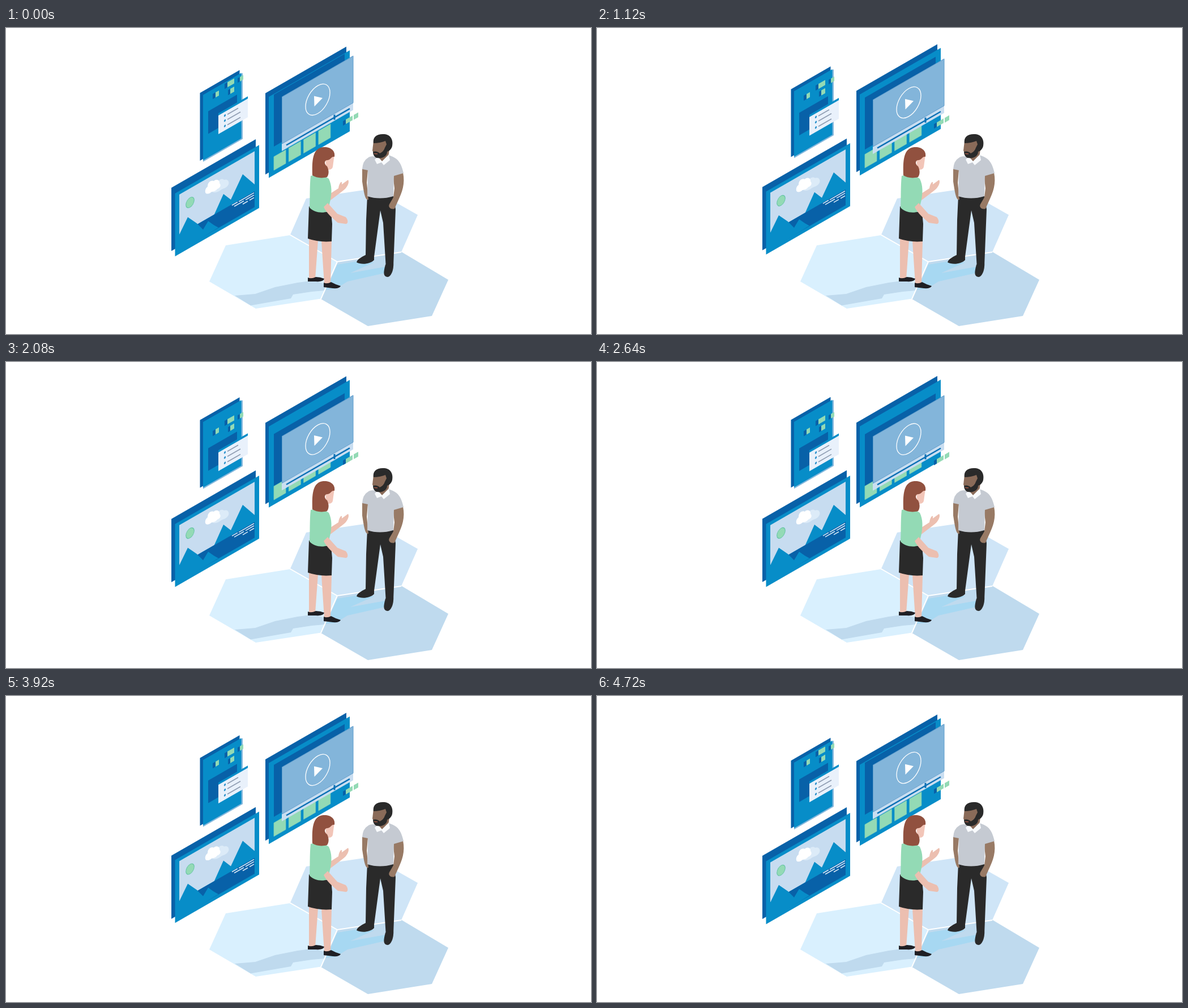
An HTML page with a canvas that plays this animation: 1033x542 px, repeating every 4800 ms.

```html
<!DOCTYPE html>
<html lang="en">
<head>
<meta charset="utf-8">
<title>Floating panels</title>
<style>
  html, body { margin: 0; width: 100%; height: 100%; overflow: hidden; background: #fff; }
  canvas { display: block; }
</style>
</head>
<body>
<canvas id="stage" width="1033" height="542"></canvas>
<script>
const ctx = document.getElementById('stage').getContext('2d');
const LOOP = 4800, STEP = 80, SLOPE = Math.tan(Math.PI / 6);
const DARK = '#0861a8', BLUE = '#078dc8', GREEN = '#93dab5', PALE = '#c7dcf0';
const SKIN = '#ecbfb0', BROWN = '#987a65', BLACK = '#2a2a2a';

function fill(color, d) {
  ctx.fillStyle = color;
  ctx.fill(new Path2D(d));
}
function line(color, width, d) {
  ctx.strokeStyle = color;
  ctx.lineWidth = width;
  ctx.stroke(new Path2D(d));
}
// Upright rectangle seen in isometric view; x, y is its upper left corner.
const slab = (x, y, w, h) => `M${x} ${y}l${w} ${-w * SLOPE}v${h}l${-w} ${w * SLOPE}z`;
const panel = (color, x, y, w, h) => fill(color, slab(x, y, w, h));

function oval(x, y, rx, ry) {
  const path = new Path2D(), flat = new Path2D();
  flat.ellipse(0, 0, rx, ry, 0, 0, 7);
  path.addPath(flat, new DOMMatrix([1, -SLOPE, 0, 1, x, y]));
  return path;
}
function dot(color, x, y, rx, ry = rx) {
  ctx.fillStyle = color;
  ctx.fill(oval(x, y, rx, ry));
}
function shifted(dy, draw) {
  ctx.save();
  ctx.translate(0, dy);
  draw();
  ctx.restore();
}
function cube(x, y, depth, w, h) {
  panel(DARK, x, y, depth, h);
  panel(GREEN, x + depth, y - depth * SLOPE, w, h);
}

function listPanel() {
  panel('#82b7dd', 348, 120, 70, 117);
  panel(DARK, 342.5, 115, 70, 120);
  panel(BLUE, 348, 118.5, 67.5, 116);
}
function listCard() {
  panel(DARK, 357, 147.5, 51, 40);
  panel(BLUE, 375, 151, 52, 6);
  panel('#e9f1fb', 375, 155, 52, 33);
  for (const [y, w] of [[155, 19], [164, 23], [173.5, 23]]) {
    dot('#2f93cc', 386.5, y, 1.7, 2);
    line('#8f9db2', 1.7, `M391 ${y - 2}l${w} ${-w * SLOPE}`);
  }
  cube(365, 117, 5, 6, 9);
  cube(386, 99, 5, 12, 9);
  cube(392, 110, 4, 7, 9);
  cube(409, 89, 4, 6, 8);
}

function landscape() {
  panel(BLUE, 298.5, 293, 148.5, 111.5);
  panel(PALE, 306, 295, 133, 71);
  dot('#64c3a5', 325, 309, 7.8, 9);
  dot(GREEN, 325, 309, 6.8, 8);
  fill('#dcebf8', 'M364 290C362 283 368 279 371 278C374 270 380 265 385 269C393 266 396 275 391 280C388 284 383 284 379 287C373 292 367 292 364 290z');
  fill('#fff', 'M353 293C350 289 353 283 356 281C356 273 362 269 367 271C372 266 378 270 377 275C381 279 377 284 373 285C370 290 365 289 362 291C359 294 355 294 353 293z');
  fill(BLUE, 'M367 332L384 294L397 304L418 259L439 277V292z');
  panel(DARK, 306, 366, 133, 28);
  fill(BLUE, 'M305 368L321 335L337 346L348 357L357 342L367 349L375 353.5L306 396z');
  for (const [x, y, w] of [[399, 314, 10], [411, 307.5, 27], [403, 316, 17], [423, 304.5, 15], [418, 312, 9], [430, 305, 8]])
    line('#d7e8f6', 1.6, `M${x} ${y}l${w} ${-w * SLOPE}`);
}

function videoPanel() {
  panel(DARK, 458, 115.5, 143, 144);
  panel(BLUE, 464, 122, 143, 143.5);
}
function thumbnails() {
  for (let i = 0; i < 4; i++) {
    const x = 473 + i * 26.3, y = 228 - i * 26.3 * SLOPE;
    panel(GREEN, x, y, 21, 24);
    line('#7fd0b8', 0.8, slab(x, y, 21, 24));
  }
}
function player() {
  panel('#c9def1', 487, 204, 126, 14);
  panel('#83b5da', 487, 122, 126, 83);
  line('#5d9bcb', 1, slab(487.5, 122, 125.5, 83));
  line('#0c70b5', 2.4, `M495 207.5l112 ${-112 * SLOPE}`);
  line('#0c70b5', 3, 'M580 153.5v9');
  ctx.strokeStyle = '#fff';
  ctx.lineWidth = 1.3;
  ctx.stroke(oval(550.5, 126.8, 21.5, 24.7));
  fill('#fff', 'M544 120.5L559 124L544.5 139z');
  cube(595, 165, 5, 12, 8);
  panel(GREEN, 614, 154, 8, 8.5);
}

function ground() {
  const left = 'M388 385L501 367L585 414L556 479.5L441 497L359 449z';
  const middle = 'M502 366L530 302L646 285L727 331L698 397L585 414z';
  const right = 'M585 414L699 397L781 446L752 510L639 528L556 480z';
  fill('#cfe5f7', middle);
  fill('#d9f0fe', left);
  fill('#bfdaee', right);
  fill('#bfdaee', 'M404 474L440 471L475 459L515 451L545 447L567 455L562 465L540 467L507 472L503 479L432 491.5z');
  fill('#a7d8f2', 'M562 464L573 446L585 419L622 413L650 415L608 434L669 423V434L603 449L582 462z');
  line('#fff', 2, 'M501 366L585 414L698 397M585 414L556 480');
}

function woman() {
  fill(SKIN, 'M535 372L551 376L546 445H535zM557 377H575L573 454H562z');
  fill('#1f1f24', 'M533 442Q539 445 547 441Q555 441 562 444Q561 450 547 449L533 449zM561 451Q567 454 574 450Q581 454 591 457Q589 462 577 461L561 459z');
  fill(SKIN, 'M570 295L587 284C588 277 591 272 593 273L593 277L604 269C607 273 603 283 594 289L573 305z');
  fill(BLACK, 'M535 316Q551 327 574 326L576 347L575 378Q553 380 533 373z');
  fill(GREEN, 'M538 262C549 259 564 262 570 267C576 280 575 292 573 304L568 325C557 329 543 326 536 318C537 300 536 280 538 262z');
  fill(SKIN, 'M561 317L568 310L585 329L600 335C605 341 604 347 600 347L586 345C578 338 565 327 561 317z');
  fill('#f2c5b8', 'M564 232L580 224L577 246Q576 251 569 251L565 245z');
  fill('#91513f', 'M541 261C541 244 538 213 560 211C574 210 582 218 580 228C574 227 574 233 568 234C561 234 562 242 567 245C571 253 570 260 567 264C557 267 547 265 541 261z');
}

function man() {
  fill(BLACK, 'M638 297Q660 305 684 297L688 321L684 422L671 426L666 345L661 323L650 405H635L636 340z');
  fill(BLACK, 'M635 402H650V411C643 418 628 420 619 415Q620 409 635 402z');
  fill(BLACK, 'M670 419L684 416C685 429 680 440 674 441C666 440 666 434 670 419z');
  fill(BROWN, 'M629 249L639 251L637 274L640 304C634 306 632 291 629 272z');
  fill(BROWN, 'M683 259L701 256C705 276 700 290 691 309L686 320C680 322 674 318 677 312L684 300L686 284z');
  fill('#c5cad2', 'M639 230C645 225 656 227 663 235L675 225C691 230 697 236 702 257L685 262L684 298Q660 305 638 298L639 252L629 250Q630 235 639 230z');
  fill('#8a6b59', 'M649 200L673 199L677 215L675 229L664 238L653 229L647 217z');
  fill('#f8fafc', 'M651 233L657 228L664 236L676 224L678 234L667 243L663 238L655 241z');
  fill(BLACK, 'M649 204C647 192 656 187 668 188C680 189 684 199 682 209C681 214 677 218 673 219C673 227 665 232 655 230Q648 228 648 219Q655 217 660 222Q667 219 669 212L672 206L670 200Q660 204 649 204z');
  line('#a45b49', 1.6, 'M650 222.5L656 223');
}

function draw(now) {
  const t = Math.floor(now % LOOP / STEP) * STEP;
  const away = Math.abs(t - LOOP / 2);
  const lift = 1 - away / (LOOP / 2);
  const lateLift = Math.max(0, 1 - away / 1560);

  ctx.clearRect(0, 0, 1033, 542);
  shifted(-14 * lift, listPanel);
  shifted(6 * lift, listCard);
  shifted(-6.3 * lateLift, () => panel(DARK, 292, 283, 149, 112));
  shifted(-6.8 * lift, landscape);
  shifted(-9 * lift, videoPanel);
  shifted(11 * lift, () => panel(DARK, 473, 118, 125, 92));
  shifted(-9 * lift, thumbnails);
  shifted(11 * lift, player);
  ground();
  woman();
  man();
}

const start = performance.now();
function tick() {
  draw(performance.now() - start);
  requestAnimationFrame(tick);
}
tick();
</script>
</body>
</html>
```
